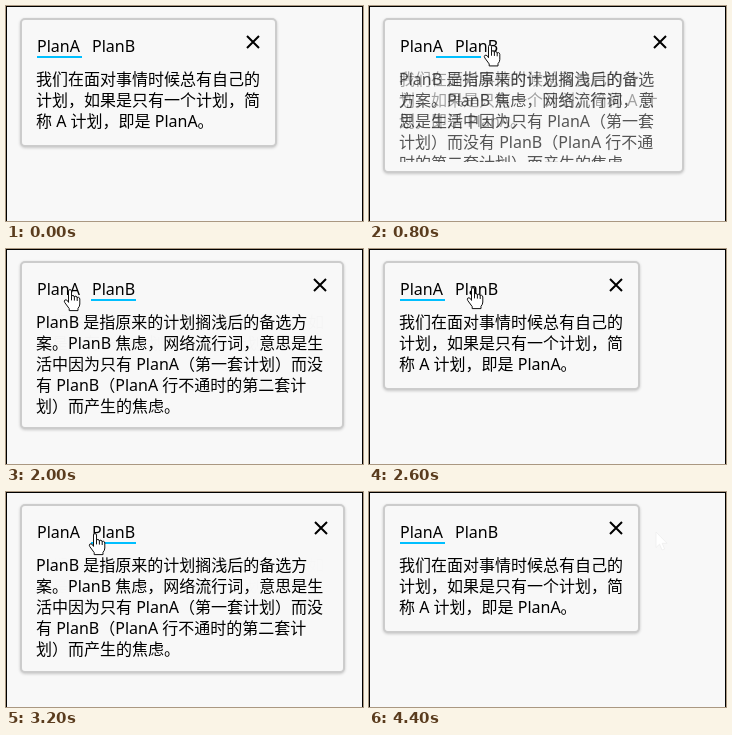
Recreate the animation shown at these times as an HTML page. Size 357 px wide and 215 px high, loop 4.8 s.

```html
<!DOCTYPE html>
<html lang="zh-CN">
<head>
<meta charset="utf-8">
<title>Plan tabs</title>
<style>
html, body { margin: 0; width: 100%; height: 100%; overflow: hidden; }
#stage {
  position: relative; width: 357px; height: 215px; overflow: hidden;
  box-sizing: border-box; background: #f8f8f8; color: #000;
  border: solid #000; border-width: 1px 1px 0;
  font: 350 16px/21px "Noto Sans", "Noto Sans CJK SC", sans-serif;
  text-spacing-trim: space-all;
}
#stage * { position: absolute; }
#card {
  left: 13px; top: 11px; box-sizing: border-box; border-radius: 5px;
  border: 2px solid #ccc; background: #f8f8f8;
  box-shadow: 0 1px 3px rgba(0, 0, 0, .2);
}
.tab { top: 29px; white-space: nowrap; }
#line { top: 49px; width: 45px; height: 2px; background: #00bfff; }
#close { top: 28px; width: 14px; height: 14px; }
#view { left: 29px; top: 62px; overflow: hidden; }
.text { left: 0; top: 0; width: 100%; }
#over { left: -1px; top: -1px; }
</style>
</head>
<body>
<div id="stage">
  <div id="card"></div>
  <div class="tab" style="left:30px">PlanA</div>
  <div class="tab" style="left:85px">PlanB</div>
  <div id="line"></div>
  <svg id="close" viewBox="0 0 14 14"><path d="M1 1L13 13M13 1L1 13" stroke="#000" stroke-width="2"/></svg>
  <div id="view">
    <div class="text" id="textA">我们在面对事情时候总有自己的计划，如果是只有一个计划，简称 A 计划，即是 PlanA。</div>
    <div class="text" id="textB">PlanB 是指原来的计划搁浅后的备选方案。PlanB 焦虑，网络流行词，意思是生活中因为只有 PlanA（第一套计划）而没有 PlanB（PlanA 行不通时的第二套计划）而产生的焦虑。</div>
  </div>
  <svg id="over" width="357" height="215">
    <path id="arrow" d="M0 0V15.5L3.6 12.2L6 18L8.6 17L6.2 11.3H11Z" fill="#fff" stroke="#eee" stroke-width=".8"/>
    <g id="hand" stroke="#111" stroke-linejoin="round" stroke-linecap="round">
      <path fill="#fff" d="M-1.5 13V2Q-1.5 .6 0 .6T1.5 2V7.5Q1.7 6.4 3 6.5T4.4 8Q4.7 7.1 5.9 7.2T7.2 8.9Q7.6 8.1 8.6 8.3T9.8 10V15Q9.8 17.5 8 19.3V21.6H-.8V19.6L-5.2 13.6Q-6.2 12-5.2 11.1T-2.8 11.4Z"/>
      <path fill="none" d="M1.5 7.5V11M4.4 8V11.2M7.2 8.9V11.6"/>
    </g>
  </svg>
</div>
<script>
const LOOP = 4800, STEP = 100, FADE = 400;
const $ = id => document.getElementById(id);
const mix = (a, b, p) => a + (b - a) * p;

// start time, tab selected (0 = A, 1 = B)
const clicks = [[648, 1], [1990, 0], [2835, 1], [4000, 0]];

// time, x, y of the pointer tip
const path = [
  [100, 237, 71], [600, 121, 38], [1200, 121, 39], [1300, 92, 41],
  [1400, 64, 40], [2000, 64, 40], [2500, 97, 39], [2600, 104, 38],
  [2900, 104, 38], [3200, 89, 41], [3400, 65, 41], [3500, 60, 40],
  [4000, 60, 39], [4400, 287, 40], [4800, 287, 40]
];

// cubic-bezier(.25, .1, .25, 1)
function ease(x) {
  if (x <= 0) return 0;
  if (x >= 1) return 1;
  const curve = (u, a, b) => 3 * u * (1 - u) * ((1 - u) * a + u * b) + u ** 3;
  let lo = 0, hi = 1;
  for (let i = 0; i < 24; i++) {
    const mid = (lo + hi) / 2;
    if (curve(mid, .25, .25) < x) lo = mid; else hi = mid;
  }
  return curve(lo, .1, 1);
}

function tabState(t) {
  let p = 0;
  for (const [start, goal] of clicks) p = mix(p, goal, ease((t - start) / FADE));
  return p;
}

function pointer(t) {
  const i = path.findIndex(k => k[0] > t);
  if (i < 1) return null;
  const [t0, x0, y0] = path[i - 1], [t1, x1, y1] = path[i];
  const p = (t - t0) / (t1 - t0);
  return [mix(x0, x1, p), mix(y0, y1, p)];
}

function showPointer(t) {
  const at = pointer(t);
  const onTab = at && at[0] < 134 && at[1] < 52;
  $("hand").style.display = onTab ? "" : "none";
  $("arrow").style.display = at && !onTab ? "" : "none";
  if (at) $(onTab ? "hand" : "arrow").setAttribute("transform", `translate(${at})`);
}

function draw(t) {
  const p = tabState(t);
  const w = mix(257, 325, p), h = mix(129, 169, p);
  $("card").style.width = w + "px";
  $("card").style.height = h + "px";
  $("view").style.width = w - 32.5 + "px";
  $("view").style.height = h - 62 + "px";
  $("line").style.left = mix(30, 84.5, p) + "px";
  $("close").style.left = w - 18 + "px";
  $("textA").style.opacity = 1 - p;
  $("textB").style.opacity = p;
  showPointer(t);
}

function tick(now) {
  draw(Math.floor(now % LOOP / STEP) * STEP);
  requestAnimationFrame(tick);
}
draw(0);
requestAnimationFrame(tick);
</script>
</body>
</html>
```
